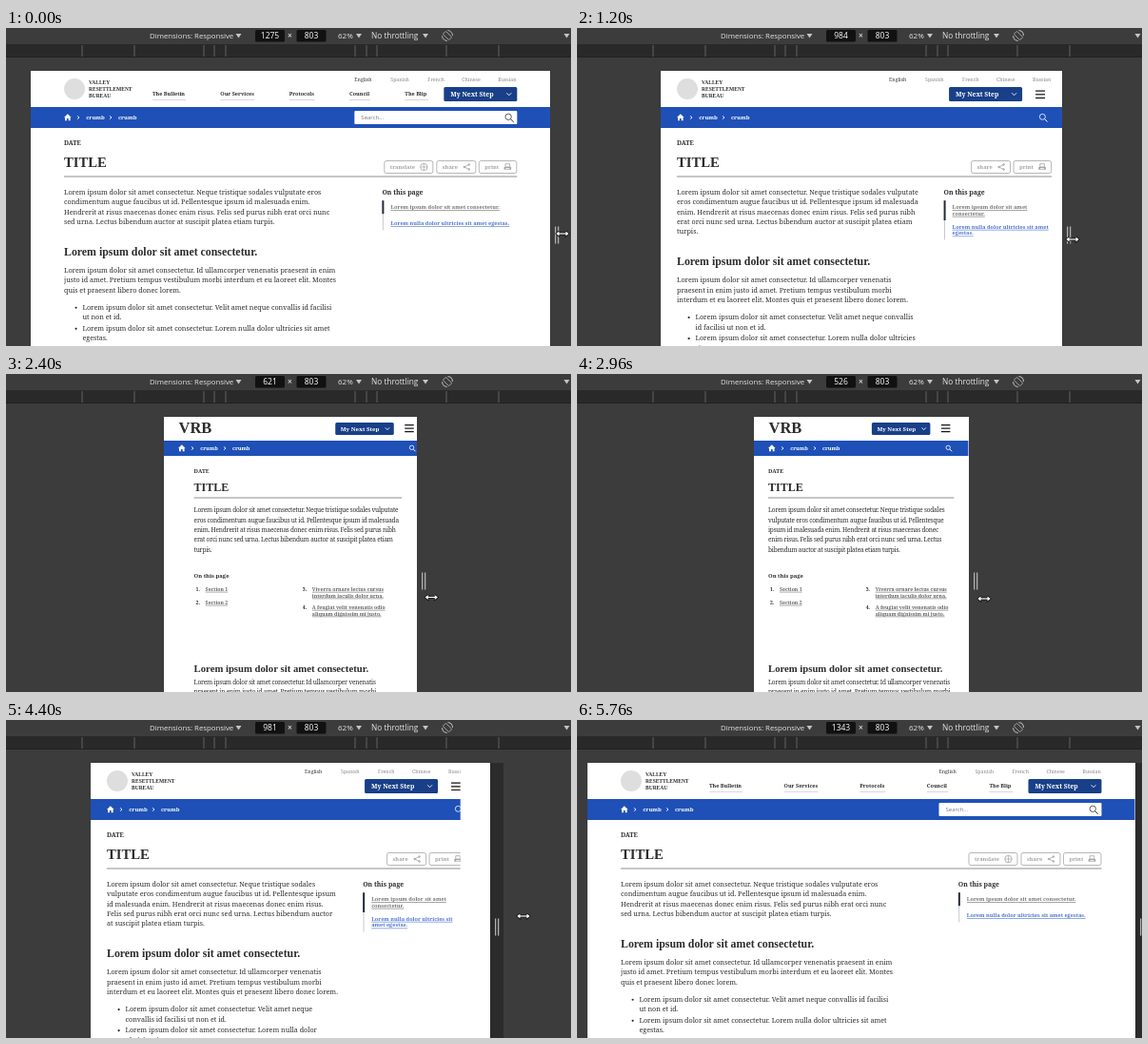
These frames come from a looping animation (594 by 334 pixels, 5840 ms). An HTML page with a canvas:

```html
<!DOCTYPE html>
<html lang="en">
<head>
<meta charset="utf-8">
<title>Responsive page resize</title>
<style>
html, body { margin: 0; width: 100%; height: 100%; overflow: hidden; background: #3c3c3c; }
canvas { display: block; }
</style>
</head>
<body>
<canvas id="stage" width="594" height="334"></canvas>
<script>
const ctx = document.getElementById('stage').getContext('2d');
const LOOP = 5840, STEP = 80, SCALE = 0.4285, CENTER = 299, TOP = 45;
const SERIF = '"Noto Serif", serif', DISPLAY = '"Liberation Serif", serif', UI = '"Open Sans", sans-serif';
const INK = '#2c2c2c', BLUE = '#1e50b7', NAVY = '#183f88', GRAY = '#a5a5a5', BACK = '#3c3c3c';

// time, viewport width, laid-out width, painted width, pointer x, pointer y
const KEYS = [
  [0, 1275, 1275, 1275, 585, 216],
  [640, 1143, 1160, 1143, 550, 218],
  [1200, 984, 999, 984, 521, 222],
  [1280, 966, 980, 966, 519, 223],
  [1920, 746, 800, 746, 472, 233],
  [2560, 579, 610, 579, 439, 235],
  [2960, 526, 526, 526, 428, 236],
  [3200, 540, 530, 530, 432, 235],
  [3600, 646, 618, 618, 463, 225],
  [3840, 723, 690, 690, 477, 220],
  [4400, 981, 964, 906, 544, 206],
  [4480, 1041, 1000, 960, 551, 205],
  [5120, 1265, 1255, 1255, 595, 200],
  [5760, 1343, 1343, 1343, 620, 200]
];

const LOREM = 'Lorem ipsum dolor sit amet consectetur.';
const INTRO = LOREM + ' Neque tristique sodales vulputate eros condimentum augue faucibus ut id. ' +
  'Pellentesque ipsum id malesuada enim. Hendrerit at risus maecenas donec enim risus. Felis sed purus ' +
  'nibh erat orci nunc sed urna. Lectus bibendum auctor at suscipit platea etiam turpis.';
const BODY = LOREM + ' Id ullamcorper venenatis praesent in enim justo id amet. Pretium tempus vestibulum ' +
  'morbi interdum et eu laoreet elit. Montes quis et praesent libero donec lorem.';
const LINK = 'Lorem nulla dolor ultricies sit amet egestas.';
const ITEMS = [
  LOREM + ' Velit amet neque convallis id facilisi ut non et id.',
  LOREM + ' ' + LINK,
  LOREM + ' Viverra ornare lectus cursus interdum iaculis dolor urna. Arcu amet lorem'
];

// Breakpoints, widest first; arrays give the words on each line
const MODES = [
  { min: 1025, big: true, wide: true, pad: 35, aside: 0.702, intro: [11, 10, 14], body: [12, 13], items: [[12], [12], [12]], links: [[], []] },
  { min: 985, big: true, pad: 17, aside: 0.712, intro: [10, 10, 12, 12], body: [9, 10], items: [[10], [10], [10]], links: [[5], [6]] },
  { min: 900, big: true, pad: 17, aside: 0.71, intro: [9, 9, 10, 12], body: [9, 10], items: [[9], [9], [9]], links: [[5], [5]] },
  { min: 768, pad: 15, aside: 0.67, intro: [9, 8, 9, 12], body: [8, 9, 10], items: [[9], [9], [8]], links: [[5], [5]] },
  { min: 576, pad: 15, max: 218.5, intro: [10, 10, 12, 12], body: [9, 10] },
  { min: 0, pad: 15, intro: [9, 8, 9, 12], body: [9, 10] }
];

function stateAt(t) {
  let i = 0;
  while (i < KEYS.length - 2 && KEYS[i + 1][0] <= t) i++;
  const a = KEYS[i], b = KEYS[i + 1], k = (t - a[0]) / (b[0] - a[0]);
  return a.map((v, n) => v + (b[n] - v) * k);
}

function rect(x, y, w, h, color, r = 0) {
  ctx.fillStyle = color;
  ctx.beginPath();
  ctx.roundRect(x, y, w, h, r);
  ctx.fill();
}

function outline(x, y, w, h, color, r) {
  ctx.strokeStyle = color;
  ctx.lineWidth = 0.8;
  ctx.beginPath();
  ctx.roundRect(x, y, w, h, r);
  ctx.stroke();
}

function line(points, color, width = 1) {
  ctx.strokeStyle = color;
  ctx.lineWidth = width;
  ctx.beginPath();
  points.forEach(([x, y]) => ctx.lineTo(x, y));
  ctx.stroke();
}

function shape(points, color) {
  ctx.fillStyle = color;
  ctx.beginPath();
  points.forEach(([x, y]) => ctx.lineTo(x, y));
  ctx.fill();
}

function ring(x, y, r, color, width = 1) {
  ctx.strokeStyle = color;
  ctx.lineWidth = width;
  ctx.beginPath();
  ctx.arc(x, y, r, 0, 7);
  ctx.stroke();
}

// y is the middle of the line
function text(str, x, y, size, { color = INK, family = SERIF, bold = false, align = 'left', spacing = 0, rule } = {}) {
  ctx.font = `${bold ? 'bold ' : ''}${size}px ${family}`;
  ctx.letterSpacing = spacing + 'px';
  ctx.fillStyle = color;
  ctx.textAlign = align;
  const base = y + size * 0.33;
  ctx.fillText(str, x, base);
  if (rule) rect(x, base + 1, ctx.measureText(str).width, 0.7, rule);
}

function breakLines(str, counts) {
  const words = str.split(' ');
  return [...counts, words.length].map(n => words.splice(0, n).join(' ')).filter(Boolean);
}

// Draws wrapped text and returns the y of its last line
function block(str, counts, x, y, size, leading, style) {
  const lines = breakLines(str, counts);
  lines.forEach((s, i) => text(s, x, y + i * leading, size, style));
  return y + (lines.length - 1) * leading;
}

function magnifier(x, y, r, color) {
  ring(x - 0.7, y - 0.7, r, color, 0.8);
  line([[x + r * 0.5, y + r * 0.5], [x + r * 1.5, y + r * 1.5]], color);
}

function hamburger(x, y, w, gap) {
  for (let i = 0; i < 3; i++) rect(x, y + i * gap, w, 1.2, '#111');
}

function nextStep(x, y, w, h, size) {
  rect(x, y, w, h, NAVY, 1.5);
  text('My Next Step', x + w * 0.09, y + h / 2, size, { color: '#fff', bold: true });
  const cx = x + w * 0.89, cy = y + h / 2, r = size * 0.36;
  line([[cx - r, cy - r / 2], [cx, cy + r / 2], [cx + r, cy - r / 2]], '#fff', 0.9);
}

function crumbs(x, y, size) {
  shape([[x, y], [x + 3.8, y - 3.7], [x + 7.6, y], [x + 6.6, y], [x + 6.6, y + 3.3], [x + 4.7, y + 3.3],
    [x + 4.7, y + 1], [x + 2.9, y + 1], [x + 2.9, y + 3.3], [x + 1, y + 3.3], [x + 1, y]], '#fff');
  for (const [arrow, label] of [[15, 23.3], [49, 57]]) {
    const ax = x + arrow;
    line([[ax - 0.8, y - 1.7], [ax + 0.8, y], [ax - 0.8, y + 1.7]], '#fff');
    text('crumb', x + label, y, size, { color: '#fff', bold: true });
  }
}

function bigHeader(mode, left, right, start, width) {
  ctx.fillStyle = '#dedede';
  ctx.beginPath();
  ctx.arc(start + 11, 64, 11, 0, 7);
  ctx.fill();
  ['VALLEY', 'RESETTLEMENT', 'BUREAU'].forEach((s, i) =>
    text(s, start + 26, 56.7 + i * 7, 5.5, { family: DISPLAY, bold: true }));
  const langs = { English: 171, Spanish: 133, French: 94, Chinese: 58, Russian: 20 };
  for (const [name, dx] of Object.entries(langs))
    text(name, right - dx, 54.3, 5.2, { color: dx === 171 ? '#333' : '#888' });

  rect(left, 83, width, 22, BLUE);
  crumbs(start, 94, 5.8);
  if (!mode.wide) {
    nextStep(right - 108, 62, 77, 15, 6.8);
    hamburger(right - 17, 65.5, 10, 3.7);
    magnifier(right - 9, 94, 3, '#fff');
    return;
  }
  nextStep(right - 77, 62, 77, 15, 6.8);
  const nav = { 'The Bulletin': 35, 'Our Services': 36, 'Protocols': 27, 'Council': 22, 'The Blip': 25 };
  const gap = (right - start - 186 - 145) / 4;
  let x = start + 93;
  for (const [name, w] of Object.entries(nav)) {
    text(name, x, 69.5, 5.5, { bold: true });
    rect(x, 75, w, 0.8, '#ccc');
    x += w + gap;
  }
  rect(right - 171, 87, 171, 14, '#fff', 1);
  text('Search...', right - 164, 94, 6, { color: '#777', family: UI });
  magnifier(right - 8.5, 94, 3.2, '#333');
}

function smallHeader(left, edge, width) {
  text('VRB', left + 15.5, 56.7, 16.5, { family: DISPLAY, bold: true });
  nextStep(edge - 101.5, 51, 61.5, 13, 6.1);
  hamburger(edge - 28.5, 53, 9.5, 3.5);
  rect(left, 70, width, 16, BLUE);
  crumbs(left + 15, 78, 5.5);
  magnifier(edge - 20.5, 78, 2.2, '#fff');
}

function actionIcon(name, x, y) {
  if (name === 'translate') {
    ring(x, y, 3.7, GRAY, 0.8);
    line([[x - 3.7, y], [x + 3.7, y]], GRAY, 0.7);
    line([[x, y - 3.7], [x, y + 3.7]], GRAY, 0.7);
  } else if (name === 'share') {
    line([[x + 2.5, y - 2.5], [x - 2.5, y], [x + 2.5, y + 2.5]], GRAY, 0.8);
    [[2.5, -2.5], [-2.5, 0], [2.5, 2.5]].forEach(([dx, dy]) => ring(x + dx, y + dy, 0.8, GRAY, 1));
  } else {
    outline(x - 2.3, y - 3.3, 4.6, 3.3, GRAY, 0);
    rect(x - 3.8, y, 7.6, 2.8, GRAY, 0.5);
    rect(x - 2, y + 1.2, 4, 1, '#fff');
  }
}

function actions(mode, right, y) {
  const list = mode.big ? [['print', 40.5, 40], ['share', 85, 41.5]] : [['print', 37, 37], ['share', 79, 39]];
  if (mode.wide) list.push(['translate', 140, 51.5]);
  for (const [name, dx, w] of list) {
    const x = right - dx;
    outline(x + 0.5, y + 0.5, w - 0.5, 13, GRAY, 2);
    text(name, x + 6.5, y + 7, 5.7, { color: GRAY, bold: true });
    actionIcon(name, x + w - 9.5, y + 7);
  }
}

function asideLinks(mode, x, y) {
  const size = mode.big ? 5.6 : 5.2;
  text('On this page', x, y, mode.big ? 6.9 : 5.8, { bold: true });
  const first = y + (mode.big ? 15.7 : 13.5);
  const end = block(LOREM, mode.links[0], x + 9, first, size, 6.8, { color: '#777', bold: true, rule: '#888' });
  const next = end + (mode.wide ? 17.2 : 14);
  const last = block(LINK, mode.links[1], x + 9, next, size, 6.6, { color: '#4f76d2', bold: true, rule: '#6c8cd8' });
  rect(x + 0.5, first - 7, 0.8, last - first + 14, '#bbb');
  rect(x, first - 7, 2, end - first + 14, '#222a38');
}

function sectionLinks(start, width) {
  text('On this page', start, 212, 5.9, { bold: true });
  const column = start + width / 2 + 5, style = { color: '#666', bold: true, rule: '#888' };
  const entries = [
    [start + 2, 226, 'Section 1'], [start + 2, 240, 'Section 2'],
    [column, 226, 'Viverra ornare lectus cursus', 'interdum iaculis dolor urna.'],
    [column, 245, 'A feugiat velit venenatis odio', 'aliquam dignissim mi justo.']
  ];
  entries.forEach(([x, y, ...lines], i) => {
    text(i + 1 + '.', x, y, 5.2, { bold: true });
    lines.forEach((s, n) => text(s, x + 10, y + n * 6.8, 5.2, style));
  });
}

function page(left, width) {
  const mode = MODES.find(m => width / SCALE >= m.min);
  const edge = left + width;
  const inner = Math.min(width - 2 * mode.pad, mode.max || Infinity);
  const start = left + (width - inner) / 2, right = start + inner;
  const { big, aside } = mode;
  const size = big ? 7.18 : 6.5, leading = big ? 10.35 : 10.45;
  const copy = { spacing: big ? 0 : -0.21 };

  if (big) bigHeader(mode, left, right, start, width);
  else smallHeader(left, edge, width);

  text('DATE', start, big ? 121 : 102.3, big ? 6.5 : 5.8, { bold: true });
  text('TITLE', start, big ? 141 : 118.8, big ? 14.7 : 12, { family: DISPLAY, bold: true });
  rect(start, big ? 155.5 : 129.5, inner, 1, '#8d8d95');
  if (aside) actions(mode, right, big ? 139 : 115.5);

  const top = big ? 172.5 : 143;
  let y = block(INTRO, mode.intro, start, top, size, leading, copy);
  if (aside) asideLinks(mode, start + inner * aside, top);
  else sectionLinks(start, inner);

  y = aside ? y + (big ? 31.5 : 23) : 309;
  text(LOREM, start, y, big ? 11.85 : 10.7, { family: DISPLAY, bold: true });
  y = block(BODY, mode.body, start, y + (big ? 19.7 : 14.5), size, leading, copy);
  if (!aside) return;
  y += 18;
  for (const [i, item] of ITEMS.entries()) {
    rect(start + 11.5, y - 0.8, 2.2, 2.2, INK, 1.1);
    y = block(item, mode.items[i], start + 19.5, y, size, leading, copy) + 11.7;
  }
}

function toolbar(value) {
  const style = { color: '#e4e4e4', family: UI }, number = { color: '#fff', family: UI, align: 'center' };
  rect(0, 0, 594, 17, BACK);
  text('Dimensions: Responsive', 151, 8, 7.8, style);
  rect(262, 2, 31, 12.5, '#111', 1.5);
  rect(305.5, 2, 31, 12.5, '#111', 1.5);
  text(Math.round(value), 277.5, 8, 8.5, number);
  text('803', 321, 8, 8.5, number);
  text('×', 298.5, 8.5, 8.5, number);
  text('62%', 349, 8, 8, style);
  text('No throttling', 384, 8, 8.3, style);
  for (const x of [244.5, 371, 441, 589.5]) shape([[x - 3, 6], [x + 3, 6], [x, 10.5]], '#c4c4c4');

  ctx.save();
  ctx.translate(464, 8);
  ctx.rotate(-Math.PI / 4);
  outline(-2.2, -4.5, 4.4, 9, '#b5b5b5', 1);
  ctx.restore();
  ctx.strokeStyle = '#b5b5b5';
  for (const a of [-1.5, 1.6]) {
    ctx.beginPath();
    ctx.arc(464, 8, 5.5, a, a + 1.5);
    ctx.stroke();
  }

  rect(0, 17, 594, 13, '#292929');
  for (const d of [68, 80, 91, 164, 219])
    for (const x of [CENTER - d, CENTER + d]) rect(x - 0.5, 18, 1, 12, '#626262');
  rect(0, 30, 594, 1, '#202020');
}

function pointer(x, y) {
  for (const [color, width] of [['#111', 3], ['#fff', 1.2]]) {
    line([[x - 5, y], [x + 5, y]], color, width);
    for (const s of [-1, 1]) {
      const p = [[x + s * 3.5, y - 2.6], [x + s * 6.7, y], [x + s * 3.5, y + 2.6], [x + s * 3.5, y - 2.6]];
      if (width > 2) line(p, color, 1.5);
      shape(p, color);
    }
  }
}

function draw(now) {
  const t = Math.floor((now % LOOP) / STEP) * STEP;
  const [, value, layout, painted, px, py] = stateAt(t);
  const width = value * SCALE, left = Math.round(CENTER - width / 2), right = Math.round(CENTER + width / 2);

  rect(0, 0, 594, 334, BACK);
  toolbar(value);
  // The drag strip darkens once the pointer runs ahead of it
  if (px - right > 30) rect(right, TOP, 14, 289, '#2b2b2b');
  rect(left, TOP, right - left, 289, '#fff');

  ctx.save();
  ctx.beginPath();
  ctx.rect(left, TOP, Math.min(right - left, painted * SCALE + 0.5), 289);
  ctx.clip();
  page(left, layout * SCALE);
  ctx.restore();

  for (const dx of [5, 8]) rect(right + dx, 208.5, 1.3, 18, '#b0b0b0');
  pointer(px, py);
  requestAnimationFrame(draw);
}
requestAnimationFrame(draw);
</script>
</body>
</html>
```
